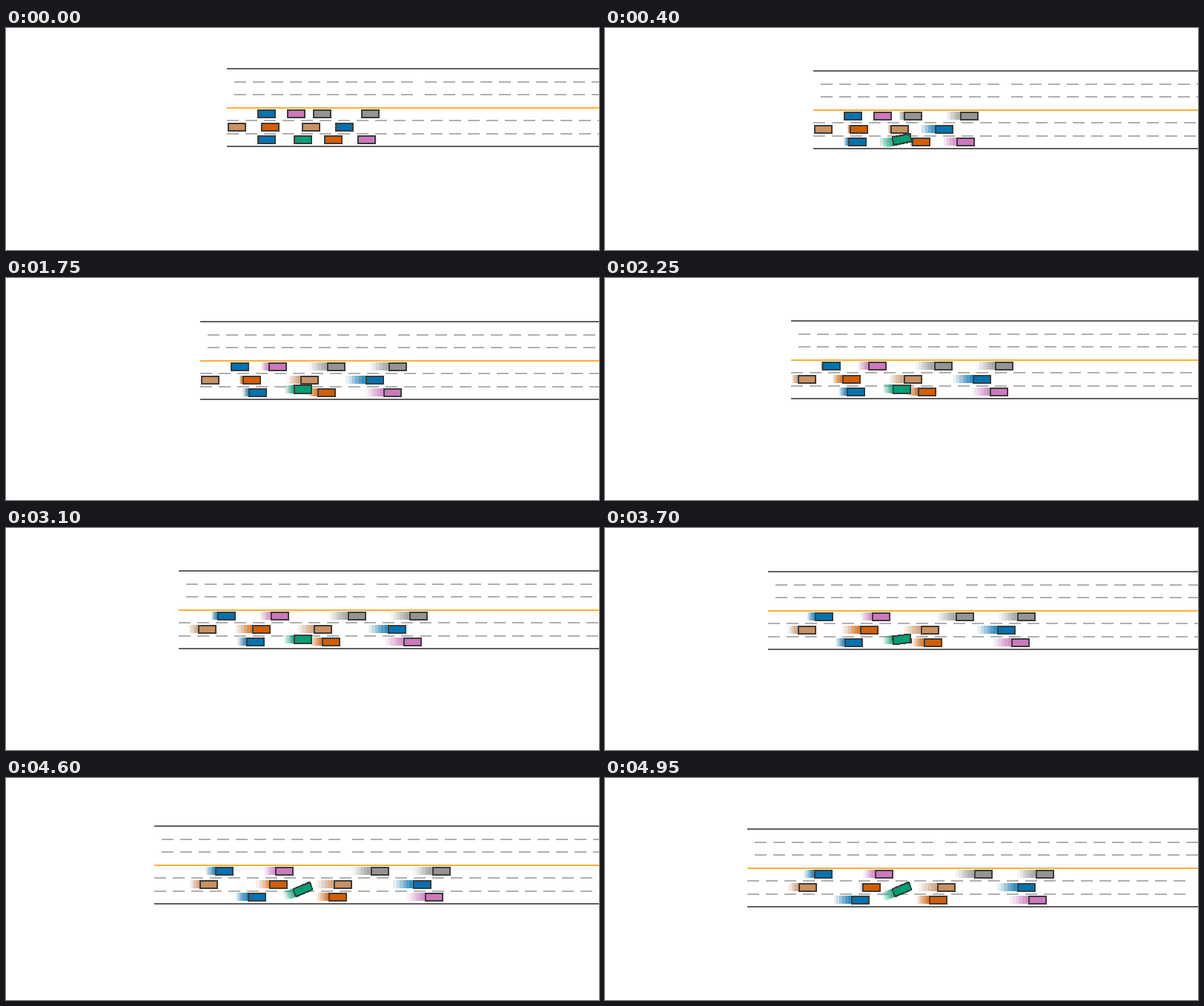
Write a matplotlib script that moves like this. It is 800x300 px and loops after 5000 ms.

```python
import numpy as np
import matplotlib.pyplot as plt
from matplotlib.animation import FuncAnimation
from matplotlib.collections import PolyCollection
from matplotlib.colors import to_rgba

W, H = 800, 300
FRAMES, STEP_MS = 100, 50
CAR_W, CAR_H, BODY_H, BORDER = 25, 12, 11, 2
EGO_LEFT, EGO_Y = 388, 150.5
DASH, PERIOD = 16, 25
GHOSTS, GHOST_GAP = 6, 2

BLUE, ORANGE, GREEN = "#0173b2", "#d55e00", "#029e73"
PINK, TAN, GRAY = "#cc78bc", "#ca9161", "#949494"
DARK, EDGE, MARK, CENTRE = "#3c3c3c", "#606060", "#b0b0b0", "#ffb030"

TIME = np.arange(FRAMES) * STEP_MS / 1000


def drive(x, speed, *changes):
    """Position at every frame; each change (start, dv, tau) eases in a new speed."""
    x = x + speed * TIME
    for start, dv, tau in changes:
        s = np.maximum(TIME - start, 0)
        x = x + dv * (s - tau * (1 - np.exp(-s / tau)))
    return x


# The green car brakes behind the queue, rolls on, then steers out of its lane.
ego_x = drive(90, 44, (.32, -40, .15), (.95, 17.45, .2), (4.5, 3, .1))
heading = np.radians(12.5 * TIME / .25 * np.exp(1 - TIME / .25)
                     - 4 * np.exp(-((TIME - 1.9) / .4) ** 2)
                     + 22 / (1 + np.exp((3.78 - TIME) / .15)))

# The camera follows it, so the road shifts the opposite way.
climb = np.diff(ego_x) * np.tan((heading[:-1] + heading[1:]) / 2)
road_x = EGO_LEFT - ego_x
road_y = 54.2 + np.concatenate([[0], np.cumsum(climb)])

# Lane centre below the road's top edge, colour, motion
LANE_A, LANE_B, LANE_C = 61.5, 79.5, 96.5
CARS = [
    (LANE_A, BLUE, drive(41, 0, (1.9, 25, 1.2))),
    (LANE_A, PINK, drive(81, 0, (.9, 25.5, .5))),
    (LANE_A, GRAY, drive(116, 0, (0, 42, .43))),
    (LANE_A, GRAY, drive(181, 42)),
    (LANE_B, TAN, drive(1, 0, (1.6, 23, .4))),
    (LANE_B, ORANGE, drive(46, 6, (1.6, 37, .6), (4.25, -43, .19))),
    (LANE_B, TAN, drive(101, 0, (0, 41, 1.2))),
    (LANE_B, BLUE, drive(146, 44)),
    (LANE_C, BLUE, drive(41, 14, (1.5, 6, .5), (4.2, 24, .25))),
    (LANE_C, ORANGE, drive(131, 0, (0, 28, .9))),
    (LANE_C, PINK, drive(176, 41)),
]


def snap(v):
    """Nearest whole pixel, halves upwards."""
    return np.floor(np.asarray(v) + .5 + 1e-6)


def box(x0, y0, x1, y1):
    return np.array([(x0, y0), (x1, y0), (x1, y1), (x0, y1)], float)


def car_box(pose, w, h):
    cx, cy, angle = pose
    c, s = np.cos(angle), np.sin(angle)
    corners = box(-w / 2, -h / 2, w / 2, h / 2) @ np.array([[c, -s], [s, c]])
    return snap(corners + (cx, cy))


def road_shapes(left, top):
    shapes = []

    def line(dy, x0, x1, color):
        if x0 < W:
            shapes.append((box(x0, top + dy, x1, top + dy + 2), to_rgba(color)))

    upper = [10 + PERIOD * k for k in range(10)] + [267 + PERIOD * k for k in range(14)]
    lower = [PERIOD * k for k in range(24)]
    for rows, starts in (((18, 35), upper), ((70, 88), lower)):
        for dy in rows:
            for x in starts:
                line(dy, left + x, left + x + DASH, MARK)
    for dy, color in ((0, EDGE), (53, CENTRE), (105, EDGE)):
        line(dy, left, W, color)
    return shapes


def car_shapes(place, color, n):
    """Fading past poses, then the outlined body; place(k) is the pose at frame k."""
    shapes = []
    for g in range(GHOSTS, 0, -1):
        k = n - g * GHOST_GAP
        if k >= 0:
            alpha = .1 + .05 * (GHOSTS - g)
            shapes.append((car_box(place(k), CAR_W, BODY_H), to_rgba(color, alpha)))
    inner = CAR_W - 2 * BORDER, CAR_H - 2 * BORDER
    shapes.append((car_box(place(n), CAR_W, CAR_H), to_rgba(DARK)))
    shapes.append((car_box(place(n), *inner), to_rgba(color)))
    return shapes


def scene(n):
    left, top = snap(road_x[n]), snap(road_y[n])
    shapes = road_shapes(left, top)
    for lane, color, xs in CARS:
        def place(k):
            return snap(road_x[n] + xs[k]) + CAR_W / 2, top + lane, 0
        shapes += car_shapes(place, color, n)

    def ego(k):
        return (EGO_LEFT + CAR_W / 2 + snap(ego_x[k] - ego_x[n]),
                EGO_Y + snap(road_y[n] - road_y[k]), heading[k])
    return shapes + car_shapes(ego, GREEN, n)


fig = plt.figure(figsize=(W / 100, H / 100), dpi=100, facecolor="white")
ax = fig.add_axes([0, 0, 1, 1])
ax.set_xlim(0, W)
ax.set_ylim(H, 0)
ax.axis("off")
art = PolyCollection([], linewidths=0, edgecolors="none", antialiaseds=False)
ax.add_collection(art, autolim=False)


def draw(n):
    verts, colors = zip(*scene(n))
    art.set_verts(verts)
    art.set_facecolor(colors)
    return (art,)


anim = FuncAnimation(fig, draw, frames=FRAMES, interval=STEP_MS, repeat=True,
                     repeat_delay=0, blit=False)
plt.show()
```
